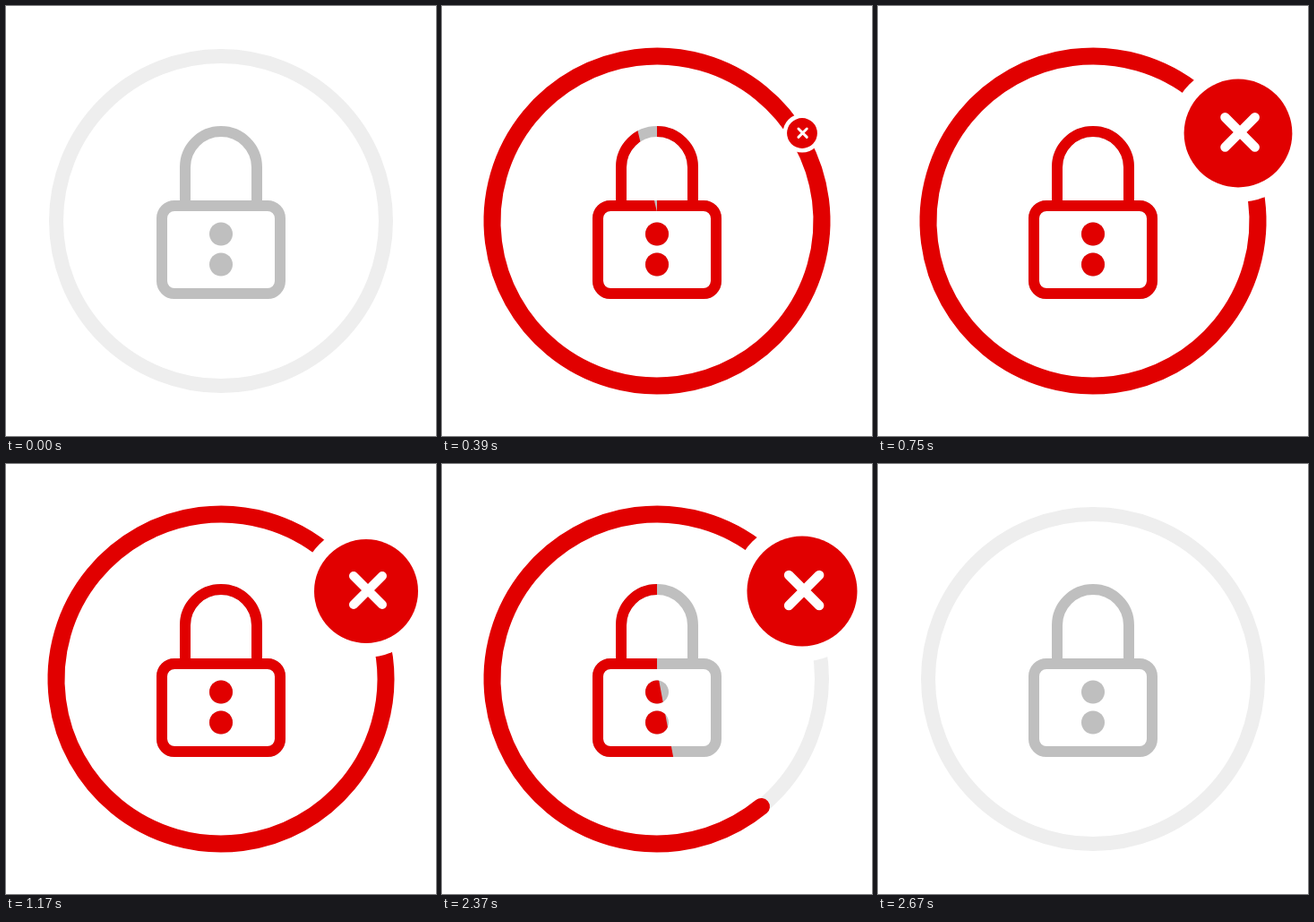
Animation of 480x480 px, one loop 3.6 s. Source, as an HTML page:

```html
<!DOCTYPE html>
<html lang="en">
<head>
<meta charset="utf-8">
<title>Lock status</title>
<style>
  html, body { margin: 0; width: 100%; height: 100%; overflow: hidden; background: #fff; }
  svg { display: block; width: 100vw; height: 100vh; }
</style>
</head>
<body>
<svg viewBox="0 0 480 480">
  <defs>
    <g id="lock">
      <path d="M200 220V180a40 40 0 0 1 80 0V220" fill="none" stroke="currentColor" stroke-width="12"/>
      <rect x="174" y="223" width="132" height="98" rx="14" fill="none" stroke="currentColor" stroke-width="12"/>
      <g fill="currentColor">
        <circle cx="240" cy="254.5" r="13"/>
        <circle cx="240" cy="288.5" r="13"/>
      </g>
    </g>
    <clipPath id="wedge"><path id="wedgePath"/></clipPath>
  </defs>

  <circle cx="240" cy="240" r="184" fill="none" stroke="#eee" stroke-width="16"/>
  <circle id="ring" cx="240" cy="240" r="184" fill="none" stroke="#e10000" stroke-width="19"
    stroke-linecap="round" pathLength="360" transform="rotate(-29 240 240)"/>

  <use href="#lock" color="#bfbfbf"/>
  <g clip-path="url(#wedge)"><use href="#lock" color="#e10000"/></g>

  <g id="badge">
    <circle r="74" fill="#fff"/>
    <circle r="58" fill="#e10000"/>
    <path d="M-14 -17L18 15M18 -17L-14 15" stroke="#fff" stroke-width="10" stroke-linecap="round"/>
  </g>
</svg>
<script>
  const LOOP = 3600, STEP = 30;
  const ENTER = 405, EXIT = 2130, EXIT_TIME = 510;
  const POP = 378, POP_TIME = 950, SETTLED = 1170;
  const GONE = 2660, SHRINK_TIME = 1060;

  const byId = id => document.getElementById(id);
  const ring = byId('ring'), wedge = byId('wedgePath'), badge = byId('badge');
  const clamp = x => Math.min(1, Math.max(0, x));
  const show = (el, on) => el.setAttribute('visibility', on ? 'visible' : 'hidden');

  // Springs past 1 and settles; u is time as a share of the full duration.
  function elastic(u, amp, period) {
    const w = 2 * Math.PI / period;
    return 1 + amp * 2 ** (-10 * u) * Math.sin(u * w - Math.asin(1 / amp));
  }

  function badgeScale(t) {
    if (t < POP || t >= GONE) return 0;
    if (t < SETTLED) return elastic((t - POP) / POP_TIME, 1.28, 0.32);
    if (t <= EXIT) return 1;
    return elastic((GONE - t) / SHRINK_TIME, 1, 0.4);
  }

  // Red part of the ring, in degrees clockwise from the badge.
  function setRing(from, to) {
    show(ring, to > from);
    ring.setAttribute('stroke-dasharray', `${to - from} 360`);
    ring.setAttribute('stroke-dashoffset', -from);
  }

  // Red sector of the lock, in degrees clockwise from the top.
  function setWedge(from, to) {
    const n = 16;
    let d = 'M240 230';
    for (let i = 0; i <= n; i++) {
      const a = (from + (to - from) * i / n) * Math.PI / 180;
      d += `L${240 + 300 * Math.sin(a)} ${230 - 300 * Math.cos(a)}`;
    }
    wedge.setAttribute('d', d + 'Z');
  }

  function draw(t) {
    const p = clamp(t / ENTER), q = clamp((t - EXIT) / EXIT_TIME);
    setRing(360 * q * q, 360 * (1 - (1 - p) ** 2));
    setWedge(360 * q, 360 * p);

    const s = badgeScale(t);
    show(badge, s > 0);
    badge.setAttribute('transform', `translate(402 142) scale(${s})`);
  }

  const start = performance.now();
  function tick() {
    const t = (performance.now() - start) % LOOP;
    draw(Math.floor(t / STEP) * STEP);
    requestAnimationFrame(tick);
  }
  tick();
</script>
</body>
</html>
```
